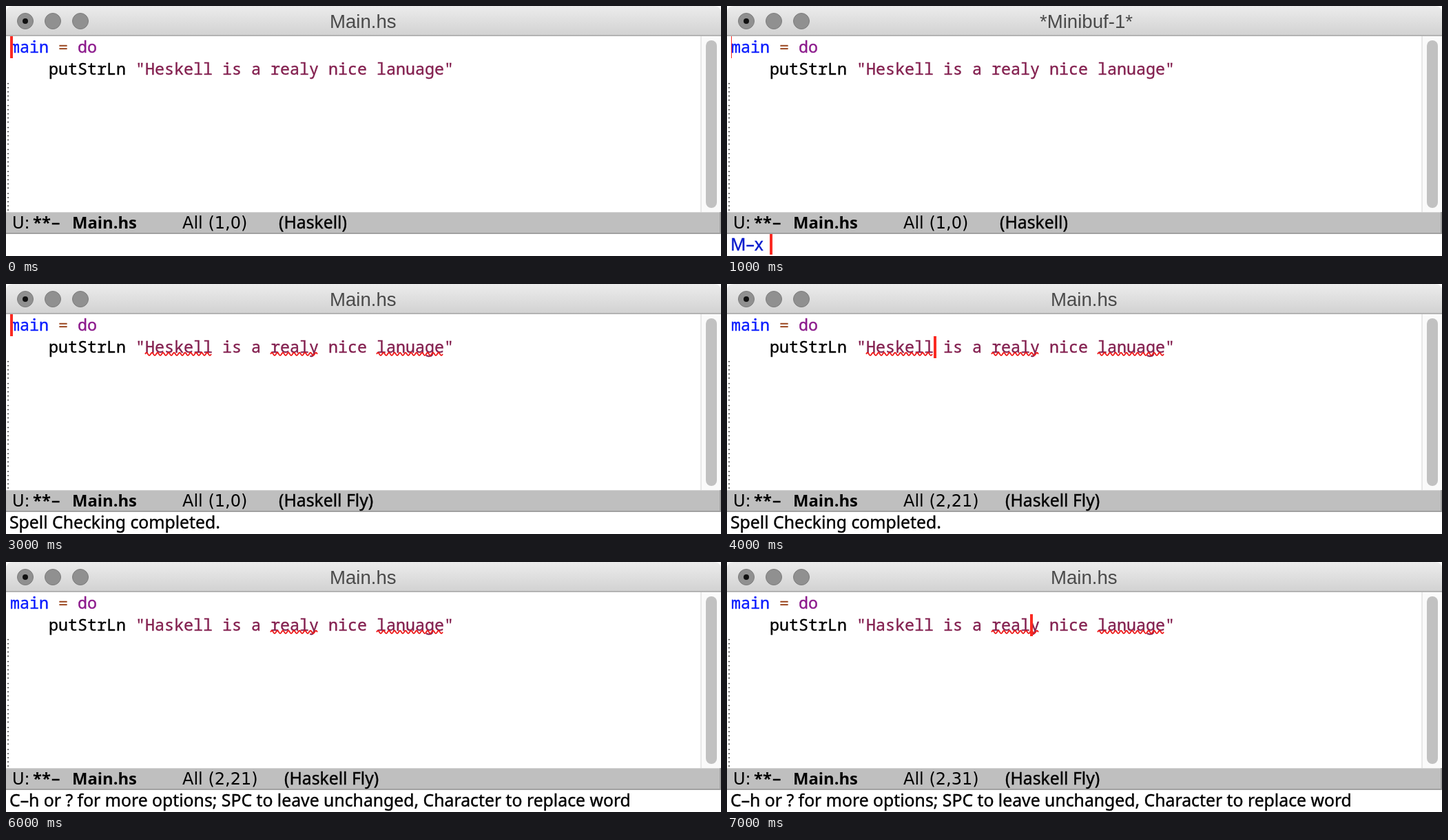
Write an HTML page that moves like this. It is 1038 px wide and 364 px high and loops after 8 s.

```html
<!DOCTYPE html>
<html lang="en">
<head>
<meta charset="utf-8">
<title>Spell checking</title>
<style>
html, body { margin: 0; width: 100%; height: 100%; overflow: hidden; background: #fff; }
svg { display: block; width: 1038px; height: 364px; }
text {
  white-space: pre; font: 24.78px "Noto Sans", sans-serif;
  color: #000; fill: currentColor; stroke: currentColor; stroke-width: .4;
}
.code { font: 23.333px "Noto Sans Mono", monospace; }
.title { font: 27.6px "Liberation Sans", sans-serif; color: #4a4a4a; stroke: none; }
.bold { font-size: 23.8px; font-weight: bold; stroke: none; }
.position { font: 24px "DejaVu Sans", sans-serif; stroke: none; }
.dim { color: #333; }
.prompt { color: #0a1ccd; }
.function { color: #0a1cff; }
.operator { color: #a0522d; }
.keyword { color: #8c1a8c; }
.string { color: #842150; }
.wave { fill: none; stroke: #ee1c1c; stroke-width: 1.8; }
</style>
</head>
<body>
<svg id="stage" viewBox="0 0 1038 364">
  <defs>
    <linearGradient id="bar" x2="0" y2="1">
      <stop stop-color="#ececec"/><stop offset="1" stop-color="#d1d1d1"/>
    </linearGradient>
    <!-- five dots beside each 32px text row -->
    <pattern id="dots" y="12" width="6" height="32" patternUnits="userSpaceOnUse">
      <path d="M3 4V30" stroke="#777" stroke-width="2" stroke-dasharray="2 4"/>
    </pattern>
  </defs>
  <path d="M0 44V10Q0 0 10 0H1028Q1038 0 1038 10V44Z" fill="url(#bar)"/>
  <path d="M0 43H1038" stroke="#b3b3b3" stroke-width="2"/>
  <g fill="#909090" stroke="#7c7c7c">
    <circle cx="28" cy="22" r="11.5"/><circle cx="68" cy="22" r="11.5"/><circle cx="108" cy="22" r="11.5"/>
  </g>
  <circle cx="28" cy="22" r="4" fill="#111"/>
  <g id="scene"></g>
</svg>
<script>
const CELL = 14, LEFT = 6, STEP = 1000;
const scene = document.getElementById('scene');

const completed = 'Spell Checking completed.';
const help = 'C-h or ? for more options; SPC to leave unchanged, Character to replace word';
const typos = { Heskell: 14, realy: 27, lanuage: 38 };

// cursor: [row, column] in the buffer; at: same, but hidden; typed: minibuffer command
const states = [
  { cursor: [0, 0] },
  { typed: '' },
  { typed: 'flyspell-prog-mode' },
  { cursor: [0, 0], fly: true, message: completed },
  { cursor: [1, 21], fly: true, message: completed },
  { at: [1, 21], fly: true, choices: true, message: 'Checking spelling of HESKELL...' },
  { at: [1, 21], fly: true, fixed: true, message: help },
  { cursor: [1, 31], fly: true, fixed: true, message: help }
];

const rect = (x, y, w, h, fill, rx = 0) =>
  `<rect x="${x}" y="${y}" width="${w}" height="${h}" rx="${rx}" fill="${fill}"/>`;
const text = (x, y, string, style = '') =>
  `<text x="${x}" y="${y}" class="${style}">${string}</text>`;
// The interface face has long hyphens.
const label = (x, y, string, style) => text(x, y, string.replace(/-/g, '–'), style);
const code = (column, y, string, style = '') =>
  text(LEFT + column * CELL, y, string, 'code ' + style);
const caret = (x, y, w = 4, h = 32) => rect(x, y, w, h, '#fa2a22');

function wave(column, length, y) {
  const bends = 't4 0'.repeat(Math.floor(length * CELL / 4) - 1);
  return `<path class="wave" d="M${LEFT + column * CELL} ${y}q2 -4 4 0${bends}"/>`;
}

function choicesPane() {
  const parts = [[2, '--'], [44, '*Choices*'], [172, '--'], [216, 'word: Heskell'],
    [390, '--'], [435, 'dict: en'], [537, '--'], [580, 'prog: NSSpellChecker']];
  return code(0, 67.5, '(0) Haskell  (1) Heckle') +
    rect(0, 78, 1038, 30, '#bfbfbf') + rect(2, 80, 1034, 26, '#e5e5e5') +
    parts.map(([x, string]) => label(x, 102, string, 'dim')).join('');
}

function buffer({ cursor, fly, fixed, typed }, top) {
  const first = top + 23.5, second = first + 32;
  const word = fixed ? 'Haskell' : 'Heskell';
  let out = code(0, first, 'main', 'function') + code(5, first, '=', 'operator') +
    code(7, first, 'do', 'keyword') + code(4, second, 'putStrLn') +
    code(13, second, `"${word} is a realy nice lanuage"`, 'string') +
    rect(0, top + 66, 6, 234 - top, 'url(#dots)') +
    rect(1008, top, 30, 300 - top, '#fafafa') + rect(1008, top, 2, 300 - top, '#e8e8e8') +
    rect(1016, top + 6, 16, (top > 44 ? 296 : 294) - top - 6, '#c1c1c1', 8);
  if (fly) {
    for (const [typo, column] of Object.entries(typos))
      if (!fixed || typo !== 'Heskell') out += wave(column, typo.length, second + 2.5);
  }
  if (cursor) out += caret(LEFT + cursor[1] * CELL, top + cursor[0] * 32);
  if (typed !== undefined) out += caret(LEFT, top, 1);
  return out;
}

function modeLine({ cursor, at, fly }) {
  const [row, column] = cursor || at || [0, 0];
  return rect(0, 300, 1038, 32, '#bfbfbf') + rect(0, 300, 1038, 1, '#d2d2d2') +
    rect(0, 330, 1038, 2, '#a0a0a0') + rect(1036, 300, 2, 32, '#a0a0a0') +
    label(9, 324, 'U:', 'position') + label(39, 324, '**', 'bold') + label(66, 324, '-') +
    label(96, 324, 'Main.hs', 'bold') +
    label(256, 324, `All (${row + 1},${column})`, 'position') +
    label(column > 9 ? 404 : 396, 324, fly ? '(Haskell Fly)' : '(Haskell)');
}

function miniBuffer({ typed, message = '' }) {
  if (typed === undefined) return label(5, 356, message);
  return label(5, 356, 'M-x', 'prompt') + label(62, 356, typed) +
    caret(typed ? 290 : 62, 332, 4, 30);
}

function draw(state) {
  const prompting = state.typed !== undefined;
  scene.innerHTML =
    text(prompting ? 454 : 470, 32, prompting ? '*Minibuf-1*' : 'Main.hs', 'title') +
    (state.choices ? choicesPane() : '') +
    buffer(state, state.choices ? 108 : 44) + modeLine(state) + miniBuffer(state);
}

const start = performance.now();
let shown = -1;
function tick() {
  const index = Math.floor((performance.now() - start) / STEP) % states.length;
  if (index !== shown) draw(states[shown = index]);
  requestAnimationFrame(tick);
}
tick();
</script>
</body>
</html>
```
